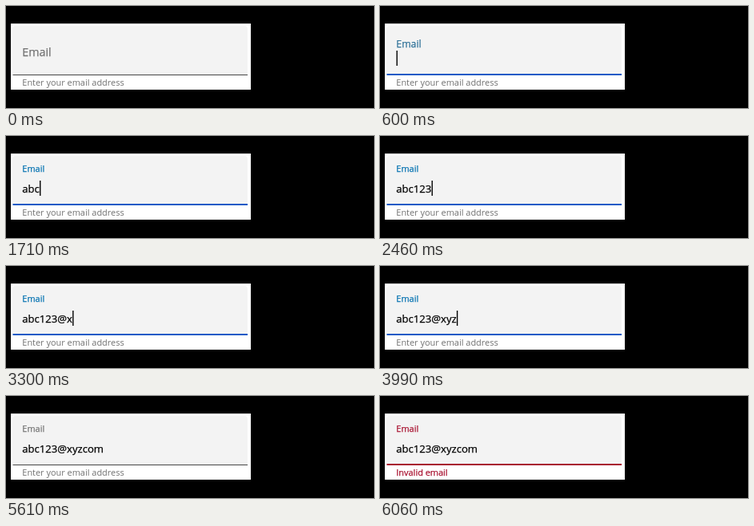
Recreate the animation shown at these times as an HTML page. Size 460 by 128 pixels, loop 6.39 s.

```html
<!DOCTYPE html>
<html lang="en">
<head>
<meta charset="utf-8">
<title>Email field</title>
<style>
  html, body { margin: 0; width: 100%; height: 100%; overflow: hidden; background: #000; }
  svg { display: block; width: 460px; height: 128px; }
  text { font-family: "Open Sans", "Noto Sans", sans-serif; font-size: 10.95px; white-space: pre; }
  #label, #value, #error { stroke: currentColor; stroke-width: .25px; fill: currentColor; }
  #value { font-size: 13.1px; color: #000; }
  #error { color: #a8102f; }
</style>
</head>
<body>
<svg viewBox="0 0 460 128">
  <rect x="6" y="22" width="300" height="83" fill="#fff"/>
  <path d="M8 86V29q0-4 4-4H298q4 0 4 4V86Z" fill="#f3f3f3"/>
  <rect id="line" x="8.5" width="293.5"/>
  <text id="label" x="20.3">Email</text>
  <text id="value" x="20.3" y="70.6"></text>
  <rect id="caret" y="56" width="1.4" height="19"/>
  <text id="hint" x="20.3" y="100" fill="#707070">Enter your email address</text>
  <text id="error" x="20.3" y="100">Invalid email</text>
</svg>
<script>
const LOOP = 6390, FOCUS = 510, BLUR = 5610;
const TEXT = "abc123@xyzcom";
const KEY_TIMES = [1140, 1500, 1710, 2040, 2310, 2460, 2940, 3300, 3750, 3990, 4500, 4740, 4890];
const GREY = [115, 115, 115], BLUE = [0, 112, 176], RED = [168, 16, 47];
const DARK = [70, 70, 70], ACCENT = "#145ac6";

const [line, label, value, caret, hint, error] =
  ["line", "label", "value", "caret", "hint", "error"].map(id => document.getElementById(id));

const clamp = x => Math.max(0, Math.min(1, x));
const lerp = (a, b, p) => a + (b - a) * p;
const mix = (a, b, p) => `rgb(${a.map((v, i) => Math.round(lerp(v, b[i], p)))})`;
const set = (el, attrs) => Object.entries(attrs).forEach(([k, v]) => el.setAttribute(k, v));

// Progress that takes its first step at `start` and its last one at `end`.
const steps = (t, start, end, count) =>
  t < start ? 0 : clamp((Math.floor((t - start) * (count - 1) / (end - start)) + 1) / count);

function draw(t) {
  const float = steps(t, FOCUS, 690, 5);
  const invalid = steps(t, 5640, 6060, 8);
  const focused = t >= FOCUS && t < BLUR;

  label.style.fontSize = lerp(14.3, 10.95, float) + "px";
  label.style.color = focused ? mix(GREY, BLUE, float) : mix(GREY, RED, invalid);
  set(label, { y: lerp(63, 44.7, float) });

  const thickness = focused ? 2 : lerp(1, 2, invalid);
  set(line, {
    y: 87 - thickness,
    height: thickness,
    fill: focused ? ACCENT : mix(DARK, RED, invalid)
  });

  const typed = TEXT.slice(0, KEY_TIMES.filter(k => k <= t).length);
  if (value.textContent !== typed) value.textContent = typed;
  const width = typed ? value.getComputedTextLength() : 0;
  set(caret, { x: 20.5 + width, opacity: focused ? 1 : 0 });

  set(hint, { opacity: 1 - invalid });
  set(error, { opacity: invalid });
}

const start = performance.now();
function tick() {
  draw((performance.now() - start) % LOOP);
  requestAnimationFrame(tick);
}
tick();
</script>
</body>
</html>
```
